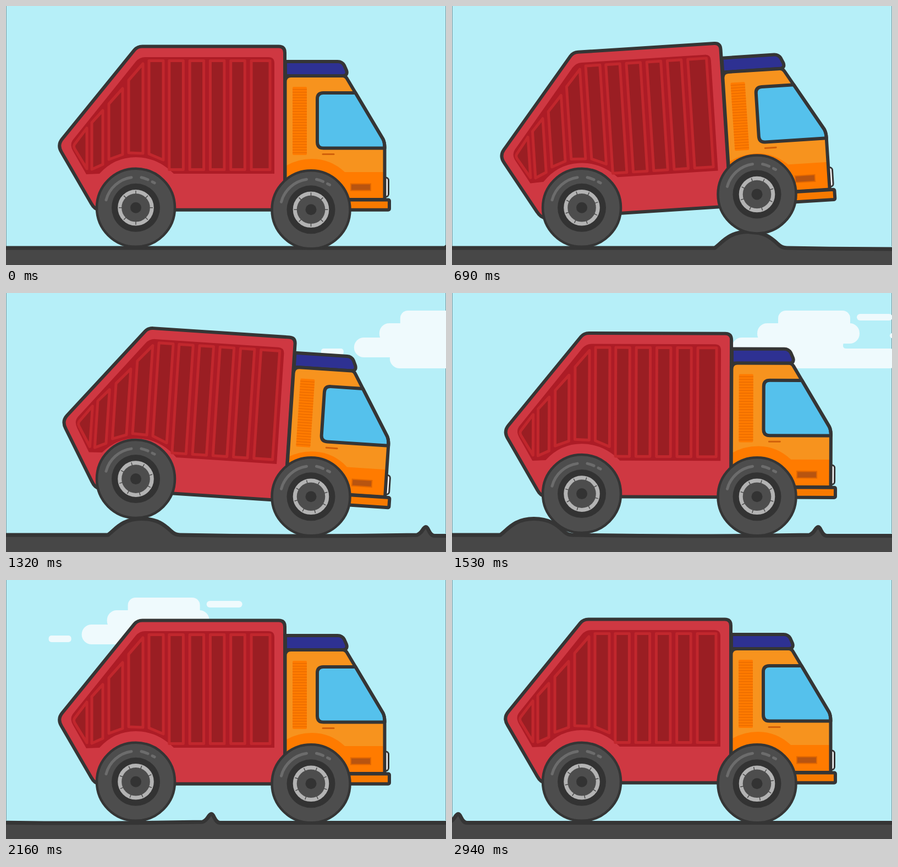
An HTML page for the animation above (2970 ms loop, 800x471 px).

```html
<!DOCTYPE html>
<html>
<head>
<meta charset="utf-8">
<title>Truck on a bumpy road</title>
<style>
html, body { margin: 0; width: 100%; height: 100%; overflow: hidden; background: #b6eff8; }
svg { display: block; width: 100%; height: 100%; }
.line { stroke: #353535; stroke-width: 6; stroke-linejoin: round; }
.bars { fill: #9a1e23; stroke: #c1272d; stroke-width: 5; stroke-linejoin: round; }
.glint { fill: none; stroke: #6c6c6c; stroke-width: 5; stroke-linecap: round; }
</style>
</head>
<body>
<svg viewBox="0 0 800 471">
  <defs>
    <g id="tyre">
      <circle r="71" fill="#4d4d4d" stroke="#353535" stroke-width="4.5"/>
      <circle r="44" fill="#333"/>
      <path class="glint" d="M-54-14A56 56 0 0 1-8-55M10-55A56 56 0 0 1 22-51M30-47L34-45"/>
      <circle r="29.3" fill="#4d4d4d" stroke="#b3b3b3" stroke-width="7"/>
      <circle r="10" fill="#333"/>
    </g>
    <path id="ticks" d="M0-31V-25M0 31V25M-31 0H-25M31 0H25" stroke="#4d4d4d" stroke-width="1.5"/>
  </defs>

  <rect width="800" height="471" fill="#b6eff8"/>
  <path d="M.5 0V437M799.5 0V437" stroke="#7d9ba2"/>
  <g id="cloud" fill="#effafd">
    <rect y="32" width="131" height="60" rx="14"/>
    <rect x="-38" y="55" width="186" height="37" rx="18"/>
    <rect x="-84" y="81" width="180" height="36" rx="18"/>
    <path d="M0 80H122Q118 92 118 96Q118 101 124 101H0Z"/>
    <rect x="-19" y="101" width="240" height="36" rx="18"/>
    <rect x="143" y="38" width="65" height="12" rx="6"/>
    <rect x="203" y="73" width="33" height="9" rx="4.5"/>
    <rect x="-144" y="101" width="41" height="12" rx="5"/>
  </g>

  <path id="road" fill="#474747" stroke="#353535" stroke-width="7" stroke-linejoin="round"/>

  <g id="body">
    <!-- container -->
    <path class="line" fill="#cf3842" d="M170 370.800Q161 370 155 359L101 266Q93 253 102 242L233.500 80Q239 73.500 248 73.500H496Q507 73.500 507 85V370.800Z"/>
    <path fill="#ad1c26" d="M122 264Q115 252 122 243L236 101Q243 93 253 93H477Q488 93 488 104V305H305Q275 275 236 275Q197 275 170 305L146 306Z"/>
    <g class="bars">
      <path d="M147 222V296L125 260Q122 255 125 251Z"/>
      <path d="M156 212L176 190V288L156 297Z"/>
      <path d="M187 178L212 150V270L187 279Z"/>
      <path d="M223 135L249 105V268L223 267Z"/>
      <path d="M260 99.500H286V280L260 269Z"/>
      <g id="slats"></g>
    </g>

    <!-- cab -->
    <rect x="680" y="312" width="15.500" height="35" rx="5" fill="#fff" stroke="#353535" stroke-width="3"/>
    <path class="line" fill="#2e3192" d="M508 101H603Q611 101 615 108L619 117Q622 126 613 127H508Z"/>
    <path id="cab" fill="#f7931e" d="M507.500 138Q507.500 127 518 127H612Q617 127 620 132L685.500 242Q688.500 248 688.500 257V352H507.500Z"/>
    <path fill="#ff7b00" d="M508 291Q530 278 557 278Q590 278 616 302H688V352H508Z"/>
    <rect x="521" y="147" width="26" height="124" rx="2" fill="#ff7b00"/>
    <path d="M534 151V270" stroke="#ea6c00" stroke-width="26" stroke-dasharray="1.500 3.500"/>
    <path class="line" fill="#55c1ec" d="M566 169Q566 158 577 158H635.500L685.500 242Q688.500 248 688.500 258.500H577Q566 258.500 566 247.500Z"/>
    <path d="M576 269.500H596" stroke="#d0600a" stroke-width="3" stroke-linecap="round"/>
    <rect x="627" y="323.500" width="36" height="12" fill="#b85410" stroke="#e26700" stroke-width="2"/>
    <use href="#cab" class="line" style="fill-opacity:0"/>
    <rect class="line" x="600" y="352.500" width="97" height="18.300" rx="2" fill="#f87a00"/>
  </g>

  <g class="wheel"><use href="#tyre"/><g><use href="#ticks"/><use href="#ticks" transform="rotate(45)"/></g></g>
  <g class="wheel"><use href="#tyre"/><g><use href="#ticks"/><use href="#ticks" transform="rotate(45)"/></g></g>
</svg>
<script>
const LOOP = 2970, STEP = 30, REAR = 236, FRONT = 554.5;
const $ = s => document.querySelector(s);
const wheels = document.querySelectorAll('.wheel');
const clamp = x => Math.max(0, Math.min(1, x));

$('#slats').innerHTML = [1, 2, 3, 4, 5].map(i =>
  `<rect x="${259.5 + 37.3 * i}" y="99.5" width="${i < 5 ? 25.5 : 34}" height="198"/>`).join('');

// Height gained by a wheel at distance d from the crest of a bump
const hump = (d, height, reach, power) =>
  height * (1 - clamp(Math.abs(d / reach)) ** power) ** 2;

function draw(t) {
  const big = 859 - 0.4642 * t, small = big + 517;
  const lift = x => hump(x - big, 29.3, 100, 2) + hump(x - small, 9.6, 50, 4);
  const rear = lift(REAR), front = lift(FRONT);

  $('#road').setAttribute('d', `M-900 480V440H${big - 61}
    C${big - 48} 431 ${big - 36} 410.5 ${big} 410.5
    C${big + 30} 410.5 ${big + 43} 423 ${big + 54} 433
    Q${big + 61} 440 ${big + 70} 440
    Q${big + 280} 444 ${small - 16} 440
    C${small - 6} 437 ${small - 5} 425.5 ${small} 425.5
    C${small + 5} 425.5 ${small + 6} 441.5 ${small + 16} 441.5
    H2400V480Z`);

  $('#cloud').setAttribute('transform', `translate(${593 - 0.5895 * (t - 1530)})`);

  const tilt = (rear - front) * 0.0023 * 180 / Math.PI;
  const rise = -2 * clamp((t - 2640) / 150);
  $('#body').setAttribute('transform', `translate(0 ${rise}) rotate(${tilt} 400 370)`);

  const spin = 3 * 360 * t / LOOP;
  [[REAR, 366.8 - rear], [FRONT, 370.3 - front]].forEach(([x, y], i) => {
    wheels[i].setAttribute('transform', `translate(${x} ${y})`);
    wheels[i].lastChild.setAttribute('transform', `rotate(${spin})`);
  });
}

function tick() {
  const t = performance.now() % LOOP;
  draw(Math.floor(t / STEP) * STEP);
  requestAnimationFrame(tick);
}
draw(0);
requestAnimationFrame(tick);
</script>
</body>
</html>
```
